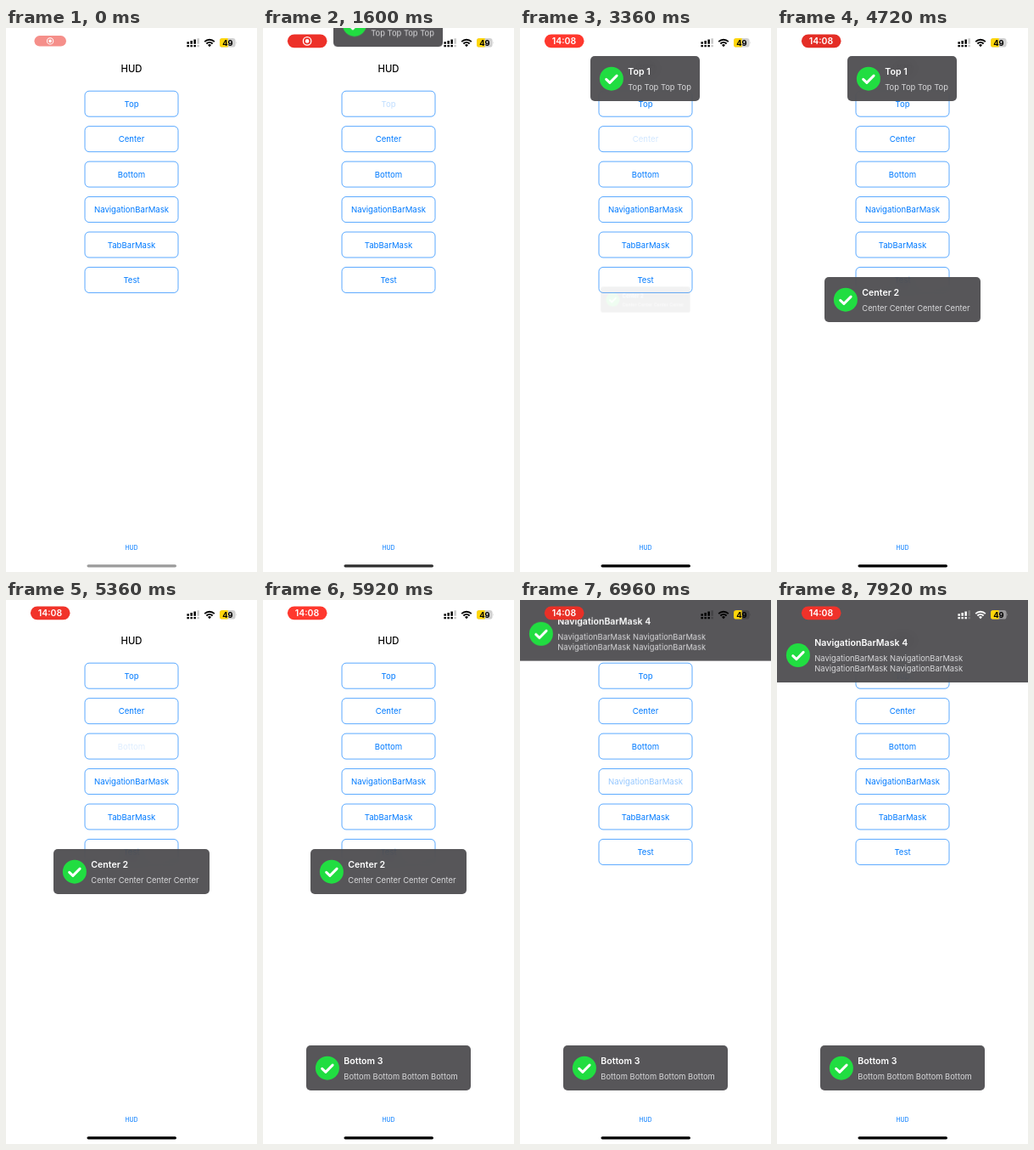
Animation of 296x640 px, one loop 8 s. Source, as an HTML page:

```html
<!DOCTYPE html>
<html>
<head>
<meta charset="utf-8">
<style>
html, body { margin: 0; width: 100%; height: 100%; overflow: hidden; background: #fff; }
#stage { position: relative; width: 296px; height: 640px; overflow: hidden; font-family: Inter, Roboto, sans-serif; }
#stage > svg { position: absolute; left: 0; top: 0; }
.toast { position: absolute; overflow: hidden; border-radius: 5px; background: rgba(69,68,71,.9); backdrop-filter: blur(8px); }
.toast svg { display: block; }
.title { font-size: 10.6px; font-weight: 600; fill: #fff; }
.body { font-size: 9.4px; fill: #d8d8da; }
.button { font-size: 9.6px; fill: #007aff; text-anchor: middle; }
</style>
</head>
<body>
<div id="stage">
  <svg id="page" width="296" height="640">
    <text x="148" y="52" font-size="11.3" font-weight="500" text-anchor="middle">HUD</text>
    <text x="148" y="613.6" font-size="6.9" fill="#007aff" text-anchor="middle">HUD</text>
  </svg>
  <svg id="status" width="296" height="640">
    <rect id="pill"/>
    <g id="rec" fill="none" stroke="#fff">
      <circle r="4.7" stroke-width="1.3"/>
      <circle r="2.3" fill="#fff" stroke="none"/>
    </g>
    <text id="clock" x="52" y="19.2" font-size="10.5" font-weight="600" fill="#fff" text-anchor="middle">14:08</text>
    <g id="icons">
      <path d="M213.4 16.3h2.5v2.4h-2.5zM217.4 15h2.5v3.7h-2.5zM221.4 13.6h2.5v5.1h-2.5zM213.4 19.9h2.5v2.4h-2.5zM217.4 19.9h2.5v2.4h-2.5zM221.4 19.9h2.5v2.4h-2.5z"/>
      <path d="M225.4 12.2h2.5v6.5h-2.5zM225.4 19.9h2.5v2.4h-2.5z" opacity=".22"/>
      <g fill="none" stroke="currentColor" stroke-width="1.9">
        <path d="M234.2 16.1a8.3 8.3 0 0 1 11.6 0"/>
        <path d="M236.4 18.5a5.1 5.1 0 0 1 7.2 0"/>
      </g>
      <path d="M240 22.2l-2-2.1a2.8 2.8 0 0 1 4 0z"/>
    </g>
    <clipPath id="cell"><rect x="252" y="12" width="18.6" height="10.6" rx="3.2"/></clipPath>
    <g clip-path="url(#cell)">
      <rect id="empty" x="252" y="12" width="19" height="11"/>
      <rect x="252" y="12" width="9.6" height="11" fill="#ffd60a"/>
    </g>
    <path id="nub" d="M271.3 15.6q1.4 1.7 0 3.4z"/>
    <text x="261.5" y="20.7" font-size="9.3" font-weight="700" text-anchor="middle">49</text>
    <rect id="home" x="95.5" y="631.2" width="105.5" height="3.2" rx="1.6"/>
  </svg>
</div>
<script>
const LOOP = 8000, STEP = 80, SLIDE = 300, LIFE = 3300;
const $ = id => document.getElementById(id);
const clamp = v => Math.max(0, Math.min(1, v));
const ease = v => (v = clamp(v), v * v * (3 - 2 * v));
const mix = (a, b, p) => a + (b - a) * p;
const set = (el, attrs) => { for (const k in attrs) el.setAttribute(k, attrs[k]); };

const labels = ['Top', 'Center', 'Bottom', 'NavigationBarMask', 'TabBarMask', 'Test'];
$('page').insertAdjacentHTML('beforeend', labels.map((label, i) => {
  const y = 74.2 + i * 41.45;
  return `<rect x="93" y="${y}" width="110" height="30" rx="5" fill="none" stroke="#007aff" stroke-width=".65"/>
    <text class="button" x="148" y="${y + 18.5}">${label}</text>`;
}).join(''));
const buttons = document.querySelectorAll('.button');

// start: release of the button, which launches the toast
const toasts = [
  { button: 0, start: 1500, x: 83.3, y: 32.7, w: 129.2, h: 53, from: -86, title: 'Top 1', lines: ['Top Top Top Top'] },
  { button: 1, start: 3310, x: 56, y: 293.3, w: 184, h: 53.2, from: 0, title: 'Center 2', lines: ['Center Center Center Center'] },
  { button: 2, start: 5400, x: 51.3, y: 524, w: 193.5, h: 53, from: 116, title: 'Bottom 3', lines: ['Bottom Bottom Bottom Bottom'] },
  { button: 3, start: 6760, x: 0, y: 0, w: 296, h: 97.3, from: -97.3, title: 'NavigationBarMask 4',
    lines: ['NavigationBarMask NavigationBarMask', 'NavigationBarMask NavigationBarMask'], wide: true }
];

for (const t of toasts) {
  const el = t.el = document.createElement('div');
  el.className = 'toast';
  el.style.cssText = `left:${t.x}px;top:${t.y}px;width:${t.w}px;height:${t.h}px;` + (t.wide ? 'border-radius:0' : '');
  const cy = t.wide ? 65 : 26.7, titleY = t.wide ? 54.3 : 21.8, lineY = t.wide ? 72.3 : 39.6;
  el.innerHTML = `<svg width="${t.w}" height="${t.h}">
    <g transform="translate(24.9 ${cy})">
      <circle r="14" fill="#21dd41"/>
      <path d="M-6.2 .7L-2 4.7L6.2 -3.6" fill="none" stroke="#fff" stroke-width="3" stroke-linecap="round" stroke-linejoin="round"/>
    </g>
    <text class="title" x="44.3" y="${titleY}">${t.title}</text>
    ${t.lines.map((s, i) => `<text class="body" x="44.3" y="${lineY + i * 11.4}">${s}</text>`).join('')}
  </svg>`;
  $('stage').insertBefore(el, $('status'));
}

function drawToast(t, now) {
  const age = now - t.start;
  const p = ease(age / SLIDE) - ease((age - LIFE) / SLIDE);
  t.el.style.display = p > 0 ? 'block' : 'none';
  if (t.from) {
    t.el.style.transform = `translateY(${t.from * (1 - p)}px)`;
  } else {
    t.el.style.transform = `scale(${mix(.54, 1, p)})`;
    t.el.style.opacity = p;
  }
  const pressed = age >= -120 && age < 470;
  buttons[t.button].setAttribute('opacity', pressed ? mix(.13, 1, clamp(age / 470) ** 1.3) : 1);
}

function drawStatus(now) {
  const grow = 1 - (1 - clamp(now / 480)) ** 2;
  const w = mix(37.5, 46.6, grow), h = mix(12.4, 15.8, grow);
  const glow = .5 + .5 * Math.cos((now - 3420) / 2600 * 2 * Math.PI);
  set($('pill'), {
    x: 52.2 - w / 2, y: 15.3 - h / 2, width: w, height: h, rx: h / 2,
    fill: `rgb(${mix(228, 255, glow)},${mix(46, 56, glow)},${mix(38, 46, glow)})`,
    opacity: mix(.54, 1, grow)
  });
  const swap = clamp((now - 2640) / 240);
  set($('rec'), { transform: `translate(52.1 15.4) scale(${mix(.78, 1, grow)})`, opacity: 1 - swap });
  set($('clock'), { opacity: swap });

  const light = ease((now - 6980) / 240), c = 255 * light;
  const ink = `rgb(${c},${c},${c})`;
  set($('icons'), { fill: ink, color: ink });
  const shade = light > .5 ? 'rgba(255,255,255,.4)' : 'rgba(0,0,0,.18)';
  set($('empty'), { fill: shade });
  set($('nub'), { fill: shade });

  const g = 155 * (1 - clamp(now / 2300));
  set($('home'), { fill: `rgb(${g},${g},${g})` });
}

function frame() {
  const now = Math.floor(performance.now() % LOOP / STEP) * STEP;
  toasts.forEach(t => drawToast(t, now));
  drawStatus(now);
  requestAnimationFrame(frame);
}
frame();
</script>
</body>
</html>
```
